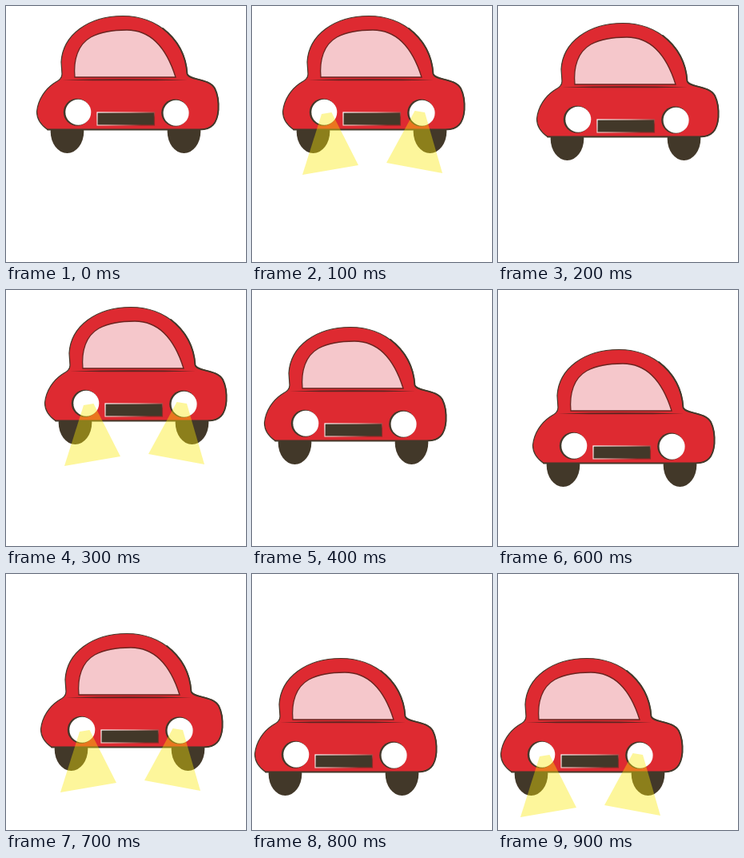
These frames come from a looping animation (300 px wide and 320 px high, 1000 ms). An HTML page:

```html
<!DOCTYPE html>
<html lang="en">
<head>
<meta charset="utf-8">
<title>Bouncing car</title>
<style>
  html, body { margin: 0; width: 100%; height: 100%; overflow: hidden; background: #fff; }
  svg { display: block; width: 100vw; height: 100vh; }
</style>
</head>
<body>
<svg viewBox="0 0 300 320">
  <defs>
    <linearGradient id="edge" x1="0" y1="0" x2="1" y2="0.4">
      <stop offset="0" stop-color="#fff"/>
      <stop offset="0.5" stop-color="#e8b5b0"/>
      <stop offset="1" stop-color="#8a2a26"/>
    </linearGradient>
  </defs>
  <g id="car">
    <g fill="#423829">
      <ellipse cx="76.5" cy="157" rx="20.8" ry="27"/>
      <ellipse cx="222.5" cy="157" rx="20.8" ry="27"/>
    </g>
    <path fill="#de2a31" stroke="#43382a" stroke-width="1.2" stroke-linejoin="round"
      d="M52 154.5 C44 149 38.500 141 38.500 132 C40 117 49 104 60 96.500
         C66 93 70 91 70 85 L69 70 C71 36 103 12.500 146 12.500
         C190 12.500 224 43 226.500 85 C229 93 254 90 261 103
         C265 111 266 121 265.500 130 C264 147 257 154.500 242 154.500 Z"/>
    <path fill="none" stroke="#43382a" stroke-width="1.9" stroke-linecap="round"
      d="M196 28 C214 42 225 61 226.500 85 C229 93 254 90 261 103
         C265 111 266 121 265.500 130 C264 147 257 154.500 242 154.500 L52 154.500"/>
    <path fill="#f5c7cb" stroke="#6b2420" stroke-width="1.3"
      d="M86 89 C84 67 90 48 106 39 C119 32 135 30 151 30
         C184 30 202 57 212 89 Z"/>
    <path fill="#5e2420" d="M70 92.500 Q148 90.200 227 92.500 Q148 94.200 70 92.500 Z"/>
    <g fill="#43382a">
      <circle cx="88.800" cy="132.700" r="17"/>
      <circle cx="211.200" cy="133.500" r="17"/>
    </g>
    <g fill="#fff">
      <circle cx="90.300" cy="132.700" r="16"/>
      <circle cx="212.600" cy="133.700" r="16"/>
    </g>
    <rect x="114" y="133" width="71.500" height="16" fill="#423829" stroke="url(#edge)" stroke-width="1.2"/>
    <g id="beams" fill="#fae805" fill-opacity="0.4">
      <path d="M87 135 L99.500 133 L133 199 L63 211 Z"/>
      <path d="M203.500 131 L216 133 L238 209 L168 196 Z"/>
    </g>
  </g>
</svg>
<script>
  const car = document.getElementById("car");
  const beams = document.getElementById("beams");
  const STEP = 100;
  const stops = [[0, 0], [10, 9], [-23, 34], [5, 62], [-35, 93]];
  const LOOP = stops.length * 2 * STEP;

  // At each stop the car waits one step dark, then one step lit.
  function draw(ms) {
    const step = Math.floor((ms % LOOP) / STEP);
    const [x, y] = stops[step >> 1];
    car.setAttribute("transform", `translate(${x} ${y})`);
    beams.setAttribute("visibility", step % 2 ? "visible" : "hidden");
  }

  const start = performance.now();
  function tick() {
    draw(performance.now() - start);
    requestAnimationFrame(tick);
  }
  tick();
</script>
</body>
</html>
```
